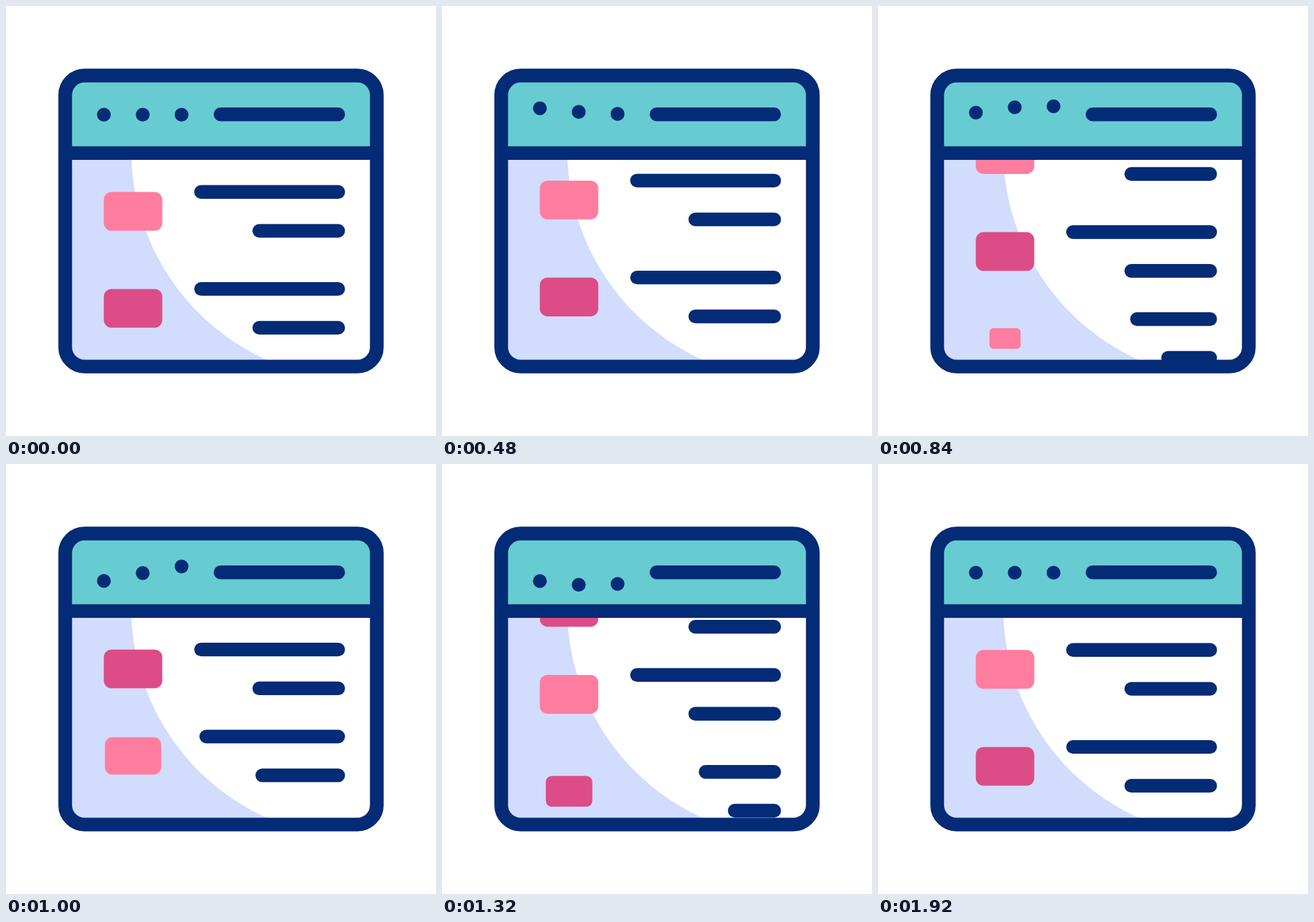
Recreate the animation shown at these times as an HTML page with a canvas. Size 640 px wide and 640 px high, loop 2000 ms.

```html
<!DOCTYPE html>
<html lang="en">
<head>
<meta charset="utf-8">
<title>Scrolling page icon</title>
<style>
  html, body { margin: 0; width: 100%; height: 100%; overflow: hidden; background: #fff; }
  canvas { display: block; width: 640px; height: 640px; }
</style>
</head>
<body>
<canvas id="stage" width="640" height="640"></canvas>
<script>
const ctx = document.getElementById('stage').getContext('2d');
const LOOP = 2000, STEP = 40;
const NAVY = '#042b76', TEAL = '#67ccd1', LILAC = '#d2dcfd';
const PINKS = ['#ff7d9f', '#dc4c86'];
const PITCH = 144.3, TRAVEL = 273.8;
const GROW = 444;

// Vertical bob of a header dot: [time, offset]
const BOB = [[40, 0], [80, 0], [200, -.6], [320, -2.8], [400, -5.8], [520, -11.1], [640, -12.5],
  [760, -9.3], [880, .6], [1000, 12.2], [1080, 16.7], [1200, 18], [1320, 12.5], [1360, 9.2],
  [1480, 2.2], [1600, .4], [1680, 0], [1720, 0]];

const clamp = v => Math.min(1, Math.max(0, v));
const smooth = s => s * s * (3 - 2 * s);

// Symmetric cubic-bezier(a, 0, 1 - a, 1)
function ease(u, a) {
  let lo = 0, hi = 1;
  for (let i = 0; i < 24; i++) {
    const s = (lo + hi) / 2, r = 1 - s;
    const x = 3 * a * s * r * r + 3 * (1 - a) * s * s * r + s ** 3;
    if (x < u) lo = s; else hi = s;
  }
  return smooth((lo + hi) / 2);
}

// Cubic Hermite curve through the bob points
function bob(t) {
  const last = BOB.length - 1;
  if (t <= BOB[0][0] || t >= BOB[last][0]) return 0;
  const i = BOB.findIndex(p => p[0] > t) - 1;
  const slope = k => {
    const p = BOB[Math.max(0, k - 1)], q = BOB[Math.min(last, k + 1)];
    return (q[1] - p[1]) / (q[0] - p[0]);
  };
  const [t0, y0] = BOB[i], [t1, y1] = BOB[i + 1];
  const h = t1 - t0, s = (t - t0) / h, r = 1 - s, w = smooth(s);
  return y0 * (1 - w) + y1 * w + h * s * r * (r * slope(i) - s * slope(i + 1));
}

function line(x0, x1, y) {
  ctx.beginPath();
  ctx.moveTo(x0, y);
  ctx.lineTo(x1, y);
  ctx.stroke();
}

function roundRect(x, y, w, h, r) {
  ctx.beginPath();
  ctx.roundRect(x, y, w, h, r);
}

function disc(x, y, r, color) {
  ctx.fillStyle = color;
  ctx.beginPath();
  ctx.arc(x, y, r, 0, 7);
  ctx.fill();
}

function row(y, color, boxScale, lineScale) {
  const w = 87 * boxScale, h = 57.7 * boxScale;
  ctx.fillStyle = color;
  roundRect(189.1 - w / 2, y - h / 2, w, h, 11.5 * boxScale);
  ctx.fill();
  if (lineScale <= 0) return;
  const right = 494.4;
  line(right - 204.1 * lineScale, right, y - 28.9);
  line(right - 117.4 * lineScale, right, y + 28.9);
}

function draw(t) {
  ctx.fillStyle = '#fff';
  ctx.fillRect(0, 0, 640, 640);
  ctx.strokeStyle = NAVY;
  ctx.lineWidth = 20.4;
  ctx.lineCap = 'round';

  // Page content, scrolling behind the window frame
  ctx.save();
  ctx.beginPath();
  ctx.rect(92, 222, 456, 310);
  ctx.clip();
  ctx.fillStyle = LILAC;
  ctx.fillRect(92, 222, 320, 310);
  disc(528.5, 215, 342, '#fff');

  const top = 305.7 - TRAVEL * ease(clamp((t - 40) / 1880), .64);
  const grown = start => smooth(clamp((t - start) / GROW));
  row(top, PINKS[0], 1, 1);
  row(top + PITCH, PINKS[1], 1, 1);
  row(top + TRAVEL, PINKS[0], grown(608), grown(608));
  row(top + TRAVEL + PITCH, PINKS[1], grown(1005), grown(1098));
  ctx.restore();

  // Header and frame
  ctx.fillStyle = TEAL;
  roundRect(88.1, 103.5, 463.8, 115.3, [28.9, 28.9, 0, 0]);
  ctx.fill();
  roundRect(88.1, 103.5, 463.8, 433.1, 28.9);
  ctx.stroke();
  line(88, 552, 218.9);
  line(319.3, 494.4, 161.2);
  for (let i = 0; i < 3; i++) {
    disc(145.7 + 57.8 * i, 161.8 + bob(t - 120 * i), 10.3, NAVY);
  }
}

const begin = performance.now();
function tick() {
  const t = (performance.now() - begin) % LOOP;
  draw(Math.floor(t / STEP) * STEP);
  requestAnimationFrame(tick);
}
tick();
</script>
</body>
</html>
```
